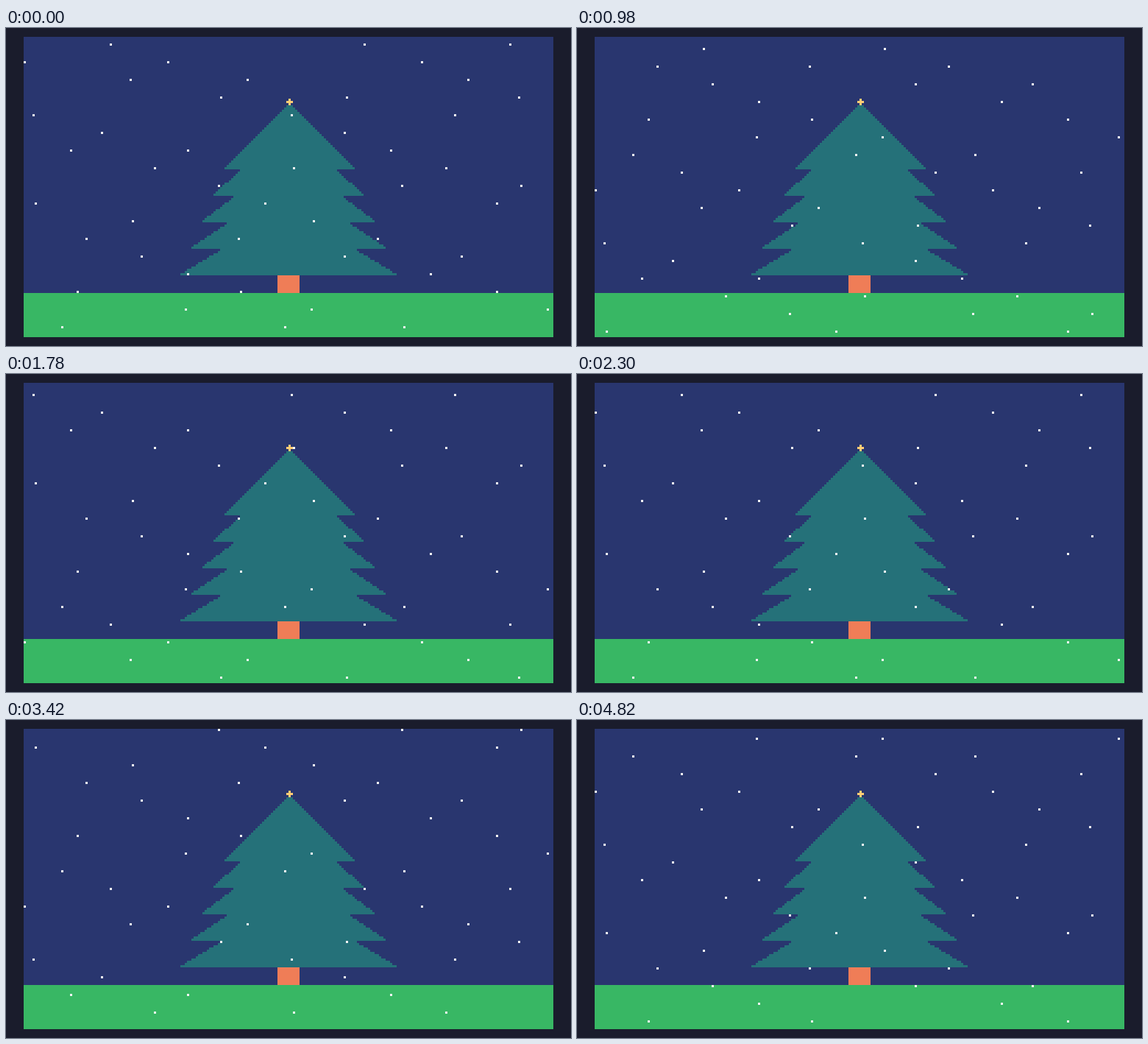
Animation of 768x432 px, one loop 4.84 s. Source, as an HTML page with a canvas:

```html
<!DOCTYPE html>
<html lang="en">
<head>
<meta charset="utf-8">
<title>Snowy tree</title>
<style>
html, body { margin: 0; width: 100%; height: 100%; overflow: hidden; background: #1a1c2c; }
canvas { display: block; }
</style>
</head>
<body>
<canvas id="stage" width="768" height="432"></canvas>
<script>
const LOOP = 4840, STEP = 20, W = 240, H = 136, FLAKES = 50;
const ctx = document.getElementById('stage').getContext('2d');

function rect(x, y, w, h, color) {
  ctx.fillStyle = color;
  ctx.fillRect(x, y, w, h);
}

// Triangle rasterised in whole pixels, 30 rows tall, with a 16-bit fixed-point slope
function branch(top, half) {
  const slope = Math.floor(half / 30 * 65536) / 65536;
  for (let row = 0; row < 30; row++) {
    const reach = slope * (row + 0.5);
    const left = Math.round(120 - reach);
    rect(left, top + row, Math.round(120 + reach) - left, 1, '#257179');
  }
}

// Flakes spread along a sine and fall one pixel per 1/60 s
function snow(shift) {
  for (let i = 0; i < FLAKES; i++) {
    const x = Math.floor(5 * i + 20 * Math.sin(i));
    const y = (11 + 40 * i + shift) % H;
    if (x < W) rect(x, y, 1, 1, '#f4f4f4');
  }
}

function draw(time) {
  ctx.setTransform(1, 0, 0, 1, 0, 0);
  rect(0, 0, 768, 432, '#1a1c2c');
  ctx.setTransform(3, 0, 0, 3, 24, 12);

  rect(0, 0, W, H, '#29366f');
  rect(0, 116, W, 20, '#38b764');
  rect(115, 108, 10, 8, '#ef7d57');
  for (let i = 0; i < 5; i++) branch(30 + 12 * i, 30 + 5 * i);
  rect(119, 29, 3, 1, '#ffcd75');
  rect(120, 28, 1, 3, '#ffcd75');
  snow(Math.floor(Math.floor(time / STEP) * 6 / 5));
}

const start = performance.now();
function tick() {
  draw((performance.now() - start) % LOOP);
  requestAnimationFrame(tick);
}
tick();
</script>
</body>
</html>
```
